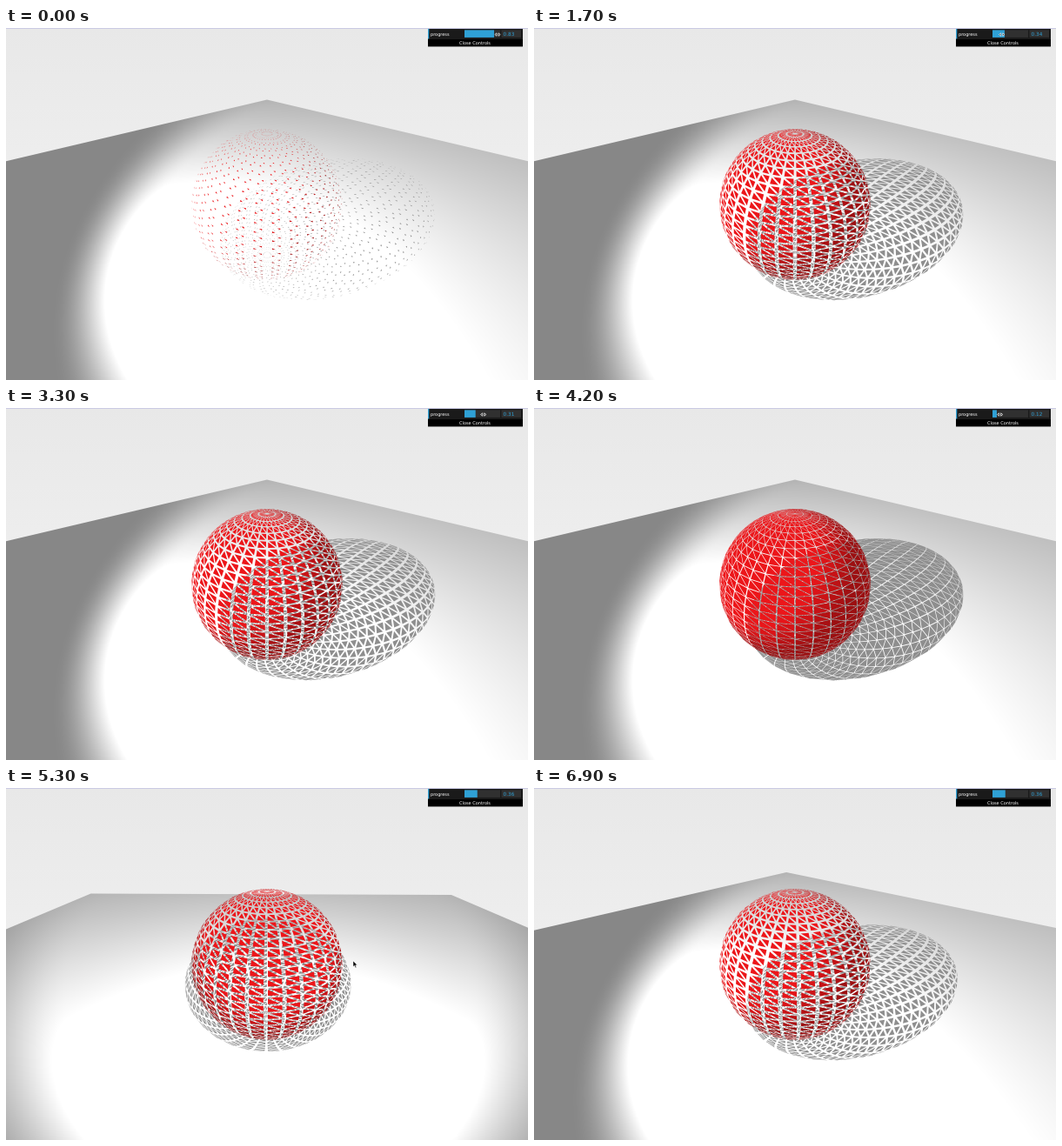
Animation, 600 px wide and 405 px high, one loop 7 s. Source, as an HTML page with a canvas:

```html
<!DOCTYPE html>
<html lang="en">
<head>
<meta charset="utf-8">
<title>Sphere progress</title>
<style>
  html, body { margin: 0; width: 100%; height: 100%; overflow: hidden; background: #ebebeb; }
  canvas, svg { position: absolute; left: 0; top: 0; width: 600px; height: 405px; }
  text { font: 5px "DejaVu Sans", sans-serif; fill: #fff; }
  #value { font-size: 5.7px; fill: #2fa1d6; }
</style>
</head>
<body>
<canvas id="stage" width="600" height="405"></canvas>
<svg viewBox="0 0 600 405">
  <rect width="600" height="1" fill="#cacae4"/>
  <rect x="485" y="1" width="109" height="20.4" fill="#000"/>
  <rect x="485" y="1" width="109" height="11.4" fill="#1a1a1a"/>
  <rect x="485" y="12" width="109" height=".5" fill="#2c2c2c"/>
  <rect x="485" y="1" width="1.3" height="11.4" fill="#2fa1d6"/>
  <text x="488" y="8.6">progress</text>
  <rect x="527" y="2.4" width="41" height="8.5" fill="#303030"/>
  <rect id="bar" x="527" y="2.4" height="8.5" fill="#2fa1d6"/>
  <rect x="569.5" y="2.4" width="22.5" height="8.5" fill="#303030"/>
  <text id="value" x="571.6" y="8.8"></text>
  <text x="539" y="18.8" text-anchor="middle">Close Controls</text>
  <path id="resize" d="M-3.2 0l2.2-1.7v3.4zM3.2 0l-2.2-1.7v3.4z"
        fill="#222" stroke="#fff" stroke-width=".7"/>
  <path id="arrow" d="M0 0v6.6l1.6-1.4 1.1 2.5 1.1-.5-1.1-2.4h2.1z" fill="#000" stroke="#fff" stroke-width=".5"/>
</svg>
<script>
const W = 600, H = 405, LOOP = 7000, STEP = 100;
const TOP = 1;                       // the view starts below a one pixel border
const MID_X = W / 2, MID_Y = (H + TOP) / 2;
const FOCAL = (H - TOP) / 2 / Math.tan(35 * Math.PI / 180);
const DIST = Math.sqrt(12);          // camera distance, in sphere radii
const HALF = 7.5, FLOOR = -1;
const LIGHT = [0, 2, 2];
const COLS = 32, ROWS = 32;

const $ = id => document.getElementById(id);
const ctx = $('stage').getContext('2d');
const ground = document.createElement('canvas');
ground.width = W;
ground.height = H;
const groundCtx = ground.getContext('2d');
const pixels = groundCtx.createImageData(W, H);

// [time, value, ...]
const PROGRESS = [
  [0, .83], [200, .96], [400, 1], [700, .95], [900, .82], [1700, .34], [2200, .08],
  [2500, 0], [2800, .04], [3300, .31], [3450, .53], [3600, .6], [3800, .35],
  [4000, .04], [4100, .06], [4200, .12], [4600, .36], [7000, .36]
];
const CAMERA = [   // azimuth, elevation
  [0, 45, 35.264], [4800, 45, 35.264], [5300, .8, 30.3], [6000, .6, 16.8], [6900, 42.6, 32]
];
const POINTER = [
  [4600, 542, 7], [4900, 349, 204], [5300, 399, 199], [6000, 388, 186], [6900, 341, 201]
];

const clamp = v => Math.min(1, Math.max(0, v));
const smooth = v => v * v * (3 - 2 * v);
const dot = (a, b) => a[0] * b[0] + a[1] * b[1] + a[2] * b[2];
const sub = (a, b) => a.map((v, i) => v - b[i]);
const mix = (a, b, k) => a.map((v, i) => v + (b[i] - v) * k);

function track(keys, t, ease = v => v) {
  let i = 0;
  while (i < keys.length - 2 && t >= keys[i + 1][0]) i++;
  const [a, b] = [keys[i], keys[i + 1]];
  return mix(a, b, ease(clamp((t - a[0]) / (b[0] - a[0])))).slice(1);
}

function spherePoint(col, row) {
  const u = col / COLS * 2 * Math.PI, v = row / ROWS * Math.PI;
  return [-Math.cos(u) * Math.sin(v), Math.cos(v), Math.sin(u) * Math.sin(v)];
}

function makeFace(...points) {
  const center = [0, 1, 2].map(i => (points[0][i] + points[1][i] + points[2][i]) / 3);
  const size = Math.hypot(...center);
  const normal = center.map(v => v / size);
  const toLight = sub(LIGHT, center);
  const lit = dot(normal, toLight) / Math.hypot(...toLight);
  const shade = Math.min(1, .66 + .7 * Math.max(0, lit));
  const color = `rgb(${[236, 22, 26].map(c => Math.round(c * shade))})`;
  return { points, center, normal, color, casts: lit < 0 };
}

const faces = [];
for (let row = 0; row < ROWS; row++) {
  for (let col = 0; col < COLS; col++) {
    const a = spherePoint(col + 1, row), b = spherePoint(col, row);
    const c = spherePoint(col, row + 1), d = spherePoint(col + 1, row + 1);
    if (row > 0) faces.push(makeFace(a, b, d));
    if (row < ROWS - 1) faces.push(makeFace(b, c, d));
  }
}

function makeView(azimuth, elevation) {
  const az = azimuth * Math.PI / 180, el = elevation * Math.PI / 180;
  const sa = Math.sin(az), ca = Math.cos(az), se = Math.sin(el), ce = Math.cos(el);
  return { sa, ca, se, ce, eye: [DIST * ce * sa, DIST * se, DIST * ce * ca] };
}

// World to camera: right, up, depth
function toCamera({ sa, ca, se, ce }, [x, y, z]) {
  const away = -(x * sa + z * ca);
  return [x * ca - z * sa, away * se + y * ce, DIST + away * ce - y * se];
}

const toScreen = ([x, y, depth]) => [MID_X + FOCAL * x / depth, MID_Y - FOCAL * y / depth];

function floorLight(x, z) {
  const dz = z - LIGHT[2], drop = LIGHT[1] - FLOOR;
  const far = Math.sqrt(x * x + drop * drop + dz * dz);
  const cone = (drop - dz) * Math.SQRT1_2 / far;
  return .53 + .75 * smooth(clamp((cone - .5) / .24)) * drop / far;
}

function shadeGround({ sa, ca, se, ce }) {
  const data = pixels.data;
  data.fill(0);
  for (let py = 0; py < H; py++) {
    const b = (MID_Y - py - .5) / FOCAL;
    const fall = b * ce - se;
    if (fall > -.01) continue;
    const t = (FLOOR - DIST * se) / fall;
    const away = t * (ce + b * se) - DIST * ce;
    for (let px = 0; px < W; px++) {
      const side = t * (px + .5 - MID_X) / FOCAL;
      const v = 255 * floorLight(side * ca - away * sa, -side * sa - away * ca);
      const i = (py * W + px) * 4;
      data[i] = data[i + 1] = data[i + 2] = v;
      data[i + 3] = 255;
    }
  }
  groundCtx.putImageData(pixels, 0, 0);
}

function addPolygon(points) {
  points.forEach(([x, y], i) => i ? ctx.lineTo(x, y) : ctx.moveTo(x, y));
  ctx.closePath();
}

function floorOutline(view) {
  const near = .1, out = [];
  const corners = [[-1, -1], [1, -1], [1, 1], [-1, 1]]
    .map(([x, z]) => toCamera(view, [x * HALF, FLOOR, z * HALF]));
  corners.forEach((a, i) => {
    const b = corners[(i + 1) % 4];
    if (a[2] > near) out.push(a);
    if (a[2] > near !== b[2] > near) out.push(mix(a, b, (near - a[2]) / (b[2] - a[2])));
  });
  return out.map(toScreen);
}

function castToFloor(p) {
  return mix(LIGHT, p, (LIGHT[1] - FLOOR) / (LIGHT[1] - p[1]));
}

function drawScene(view, progress) {
  const sky = ctx.createLinearGradient(0, 0, 0, 170);
  sky.addColorStop(0, '#e8e8e8');
  sky.addColorStop(1, '#eeeeee');
  ctx.fillStyle = sky;
  ctx.fillRect(0, 0, W, H);

  ctx.save();
  ctx.beginPath();
  addPolygon(floorOutline(view));
  ctx.clip();
  ctx.drawImage(ground, 0, 0);
  ctx.restore();
  if (progress >= 1) return;

  const shrink = f => f.points.map(p => mix(p, f.center, progress));
  ctx.beginPath();
  for (const f of faces) {
    if (f.casts) addPolygon(shrink(f).map(p => toScreen(toCamera(view, castToFloor(p)))));
  }
  ctx.fillStyle = '#8e8e8e';
  ctx.fill();

  for (const f of faces) {
    if (dot(f.normal, sub(view.eye, f.center)) <= 0) continue;
    ctx.beginPath();
    addPolygon(shrink(f).map(p => toScreen(toCamera(view, p))));
    ctx.fillStyle = f.color;
    ctx.fill();
  }
}

function place(el, shown, x, y) {
  el.style.display = shown ? '' : 'none';
  el.setAttribute('transform', `translate(${x} ${y})`);
}

function drawControls(t, progress) {
  $('bar').setAttribute('width', 41 * progress);
  $('value').textContent = progress.toFixed(2).replace(/\.?0+$/, '');
  const [ahead] = track(PROGRESS, t + 150);   // the mouse leads the slider
  place($('resize'), t < 4600, 527 + 41 * ahead, 7.5);
  place($('arrow'), t >= 4600 && t < 6850, ...track(POINTER, t, smooth));
}

const start = performance.now();
let lastTime = -1, lastAngles = '';

function draw() {
  const t = Math.floor((performance.now() - start) % LOOP / STEP) * STEP;
  if (t !== lastTime) {
    lastTime = t;
    const angles = track(CAMERA, t, smooth);
    const view = makeView(...angles);
    if (lastAngles !== String(angles)) {
      lastAngles = String(angles);
      shadeGround(view);
    }
    const [progress] = track(PROGRESS, t);
    drawScene(view, progress);
    drawControls(t, progress);
  }
  requestAnimationFrame(draw);
}
draw();
</script>
</body>
</html>
```
